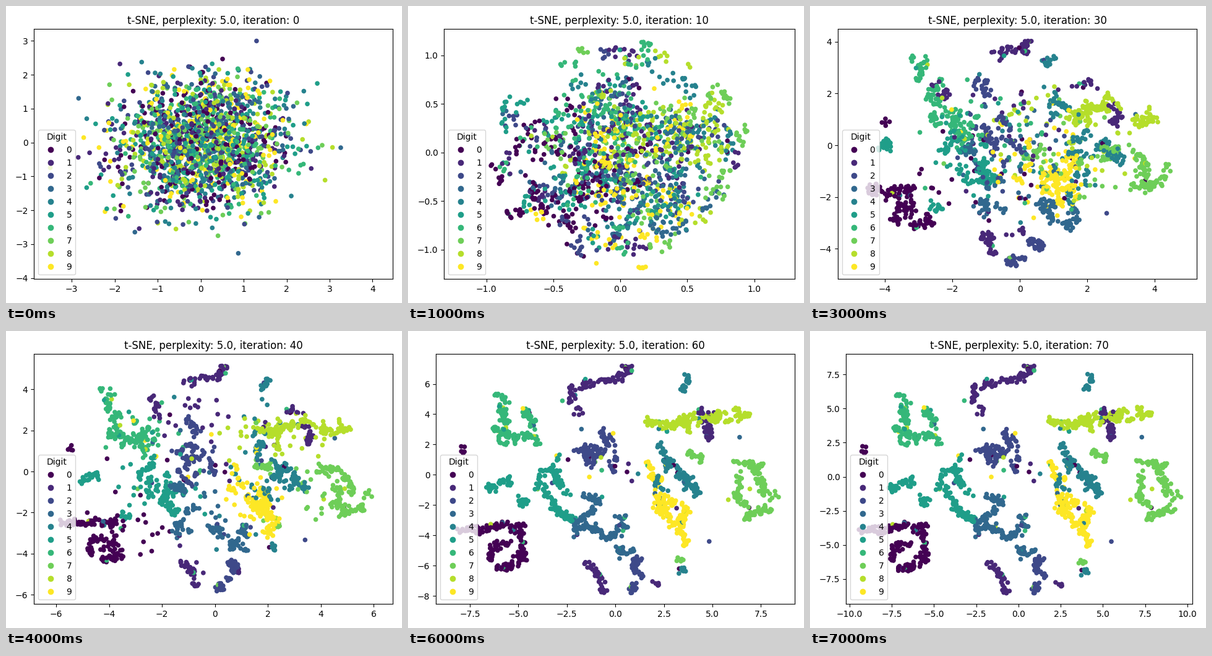
Animation of 640x480 px, one loop 8000 ms. Source, as a matplotlib script:

```python
import numpy as np
import matplotlib.pyplot as plt
from matplotlib.animation import FuncAnimation

W, H = 640, 480
MID = np.array([342, 238])
PER_DIGIT = 180
LONERS = 3
rng = np.random.default_rng(5)

# axis limits (xmin, xmax, ymin, ymax) at a few times in seconds
LIMIT_TIMES = [0, 1, 2, 3, 5, 7]
LIMITS = np.array([
    (-3.878, 4.468, -4.03, 3.345),
    (-1.316, 1.3015, -1.3015, 1.2695),
    (-2.549, 2.55, -2.3575, 2.3075),
    (-5.394, 5.248, -5.174, 4.491),
    (-8.28, 8.2, -7.74, 6.94),
    (-10.21, 10.28, -9.34, 9.0),
])

digits = []
poses = []  # per stroke: random start, mixed disc, loose clumps, final strokes


def clumped(n, wide, tight):
    """Noise in which runs of six points share an offset."""
    shared = np.repeat(rng.normal(size=(n // 6 + 1, 2)), 6, axis=0)[:n]
    return shared * wide + rng.normal(size=(n, 2)) * tight


def in_ellipse(n, rx, ry):
    angle = rng.uniform(0, 2 * np.pi, n)
    r = np.sqrt(rng.random(n))
    return MID + np.column_stack([rx * r * np.cos(angle), ry * r * np.sin(angle)])


def store(digit, loose, final):
    n = len(loose)
    start = (314.5, 220.7) + rng.normal(scale=0.95, size=(n, 2)) * (69.5, 54.65)
    d = 0.55 * (loose.mean(axis=0) - MID) + clumped(n, (70, 74), 10)
    q = np.hypot(d[:, 0] / 215, d[:, 1] / 190)[:, None]
    disc = MID + d / (1 + q ** 6) ** (1 / 6)
    digits.extend([digit] * n)
    poses.append(np.stack([start, disc, loose, final]))


def add(digit, *strokes):
    """Share one digit's points among strokes (loose centre, final ends a, b)."""
    strokes = np.array(strokes, dtype=float)
    lengths = np.hypot(*(strokes[:, 2] - strokes[:, 1]).T)
    counts = np.round((PER_DIGIT - LONERS) * lengths / lengths.sum()).astype(int)
    for (centre, a, b), n in zip(strokes, counts):
        u = np.sort(rng.random(n))[:, None]
        axis = b - a
        normal = np.array([-axis[1], axis[0]])
        curve = (u - 0.5) * axis + rng.uniform(-0.2, 0.2) * np.sin(np.pi * u) * normal
        final = (a + b) / 2 + curve + clumped(n, 3.5, 3)

        # groups near the middle are still mixed with the others
        width = 8 + 17 * np.exp(-(np.hypot(*(centre - MID)) / 120) ** 2)
        loose = centre + 0.45 * curve + clumped(n, width, 6)
        apart = rng.random(n) < 0.1
        loose[apart] = in_ellipse(apart.sum(), 180, 135)
        store(digit, loose, final)

    alone = in_ellipse(LONERS, 200, 140)
    store(digit, alone, MID + 1.1 * (alone - MID))


add(0, ((125, 285), (130, 312), (185, 318)), ((140, 300), (184, 322), (183, 372)),
    ((145, 315), (130, 374), (165, 342)), ((98, 275), (82, 324), (128, 322)),
    ((195, 322), (138, 376), (183, 370)), ((145, 198), (87, 188), (88, 197)))
add(1, ((172, 160), (265, 126), (271, 92)), ((335, 68), (275, 90), (363, 60)),
    ((430, 130), (475, 127), (495, 136)), ((495, 185), (485, 138), (484, 178)),
    ((272, 365), (286, 377), (316, 421)), ((310, 340), (392, 406), (399, 401)))
add(2, ((245, 110), (315, 165), (332, 185)), ((305, 215), (278, 190), (338, 228)),
    ((300, 300), (285, 188), (300, 215)), ((373, 393), (366, 362), (364, 392)),
    ((300, 410), (363, 395), (365, 420)))
add(3, ((225, 205), (282, 268), (308, 285)), ((300, 325), (303, 285), (268, 328)),
    ((440, 325), (285, 315), (320, 332)), ((488, 357), (318, 332), (348, 298)),
    ((430, 310), (335, 345), (360, 362)))
add(4, ((335, 97), (443, 92), (457, 67)), ((385, 112), (405, 190), (420, 225)),
    ((508, 235), (412, 208), (472, 268)), ((430, 215), (440, 230), (468, 262)),
    ((465, 305), (400, 235), (410, 255)), ((390, 265), (443, 380), (446, 395)))
add(5, ((95, 205), (135, 252), (168, 236)), ((235, 210), (212, 235), (242, 218)),
    ((290, 260), (215, 245), (268, 310)), ((300, 290), (235, 220), (250, 258)),
    ((220, 368), (172, 275), (190, 280)))
add(6, ((195, 80), (143, 98), (150, 140)), ((240, 130), (150, 135), (155, 182)),
    ((250, 190), (142, 152), (198, 175)), ((280, 245), (185, 122), (203, 180)))
add(7, ((420, 255), (530, 213), (572, 217)), ((540, 300), (537, 235), (548, 285)),
    ((510, 260), (560, 220), (578, 268)), ((552, 275), (594, 272), (545, 298)),
    ((272, 268), (455, 198), (477, 210)), ((425, 150), (433, 376), (440, 370)))
add(8, ((470, 172), (440, 145), (500, 140)), ((557, 218), (485, 141), (546, 132)),
    ((440, 190), (388, 145), (450, 143)), ((400, 240), (448, 150), (460, 157)))
add(9, ((315, 270), (390, 208), (400, 243)), ((370, 295), (405, 260), (440, 275)),
    ((365, 285), (450, 285), (451, 348)), ((385, 275), (405, 270), (447, 330)),
    ((430, 230), (402, 255), (408, 300)))

poses = np.concatenate(poses, axis=1)
digits = np.array(digits)
odd = rng.random(len(digits)) < 0.03
digits[odd] = rng.integers(0, 10, odd.sum())
order = rng.permutation(len(digits))
poses, digits = np.clip(poses[:, order], (71, 56), (599, 423)), digits[order]


def pose(t):
    """Stage positions: two mixed states, then a decelerating move to the strokes."""
    if t < 2:
        return poses[t]
    done = 1 - ((7 - t) / 5) ** 2.5
    return poses[2] + done * (poses[3] - poses[2])


fig, ax = plt.subplots(figsize=(W / 100, H / 100), dpi=100)
dots = ax.scatter(*poses[0].T, s=20, c=digits, cmap="viridis", vmin=0, vmax=9)
ax.legend(*dots.legend_elements(num=list(range(10))), loc="lower left", title="Digit")


def update(t):
    x0, x1, y0, y1 = (np.interp(t, LIMIT_TIMES, edge) for edge in LIMITS.T)
    ax.set_xlim(x0, x1)
    ax.set_ylim(y0, y1)
    ax.set_title(f"t-SNE, perplexity: 5.0, iteration: {10 * t}")
    fig.tight_layout()
    pixels = pose(t) * (1, -1) + (0.5, H - 0.5)
    dots.set_offsets(ax.transData.inverted().transform(pixels))
    return dots,


anim = FuncAnimation(fig, update, frames=8, interval=1000, repeat=True, repeat_delay=0)
plt.show()
```
